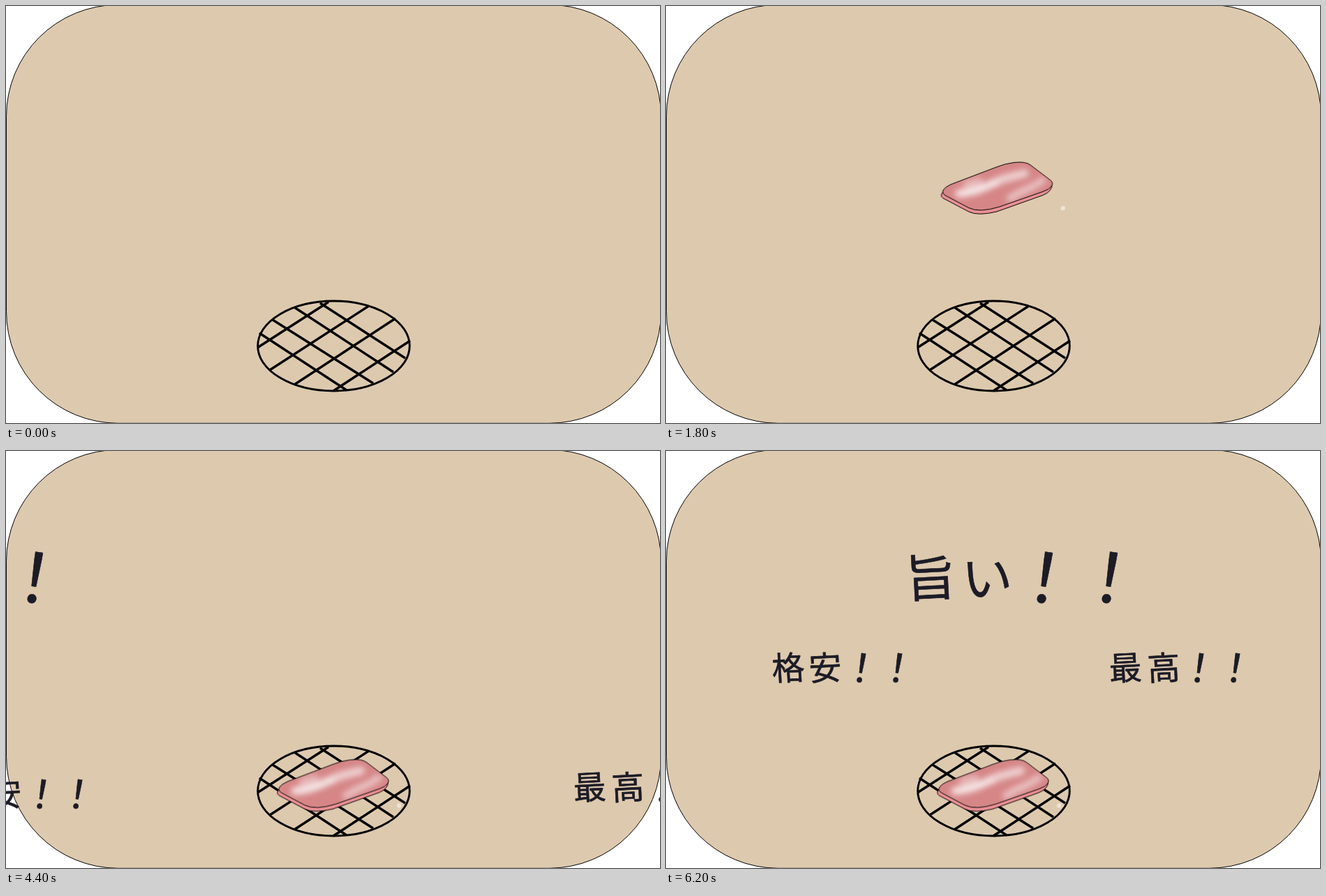
These frames come from a looping animation (937x598 px, 6500 ms). An HTML page:

```html
<!DOCTYPE html>
<html lang="ja">
<head>
<meta charset="utf-8">
<title>旨い！！</title>
<style>
  html, body { margin: 0; width: 100%; height: 100%; overflow: hidden; background: #fff; }
  svg { display: block; width: 937px; height: 598px; overflow: hidden; }
  text {
    font-family: "Noto Sans CJK JP", "Noto Sans CJK", sans-serif;
    font-weight: 500;
    fill: #1c1b26;
    stroke: #1c1b26;
    stroke-width: .6;
    stroke-linejoin: round;
  }
  .mark { font-weight: 400; }
</style>
</head>
<body>
<svg id="stage" viewBox="0 0 937 598">
  <defs>
    <filter id="soft" x="-30%" y="-60%" width="160%" height="220%">
      <feGaussianBlur stdDeviation="4.5"/>
    </filter>
    <path id="slice" d="M406 91.500 Q411 88 420 85 L478 63 Q490 58 503 56.500 Q520 54.500 527 60.500 L554 81 Q560 85 557 90 Q554 95 545 98 L482 120 Q453 129 438 121.500 L405 104 Q396 99 406 91.500 Z"/>
    <clipPath id="face"><use href="#slice"/></clipPath>
  </defs>

  <rect x=".5" y="-1.700" width="938" height="600" rx="160" fill="#ddc9ae" stroke="#000"/>

  <g fill="none" stroke="#000">
    <ellipse cx="469.500" cy="487.500" rx="108.800" ry="64.500" stroke-width="2.900"/>
    <path stroke-width="3.500" d="M450 426 L572 505 M413 432 L555 525 M382 450 L526 541 M363 469 L488 551
      M361 489.500 L462 424.500 M378 522 L520 430 M413 543 L558 448 M469 552 L579 480"/>
  </g>

  <g id="meat">
    <circle cx="573" cy="122" r="3.300" fill="#ede3d5"/>
    <path d="M402 97.500 Q396 104 401 107.500 L438 127 Q451 133.500 478 127 L544 103.500 Q558 98 557.500 87 Z" fill="#ea9094" stroke="#000"/>
    <use href="#slice" fill="#d68687"/>
    <g clip-path="url(#face)">
      <g filter="url(#soft)" fill="none" stroke="#fff" stroke-linecap="round" stroke-linejoin="round">
        <path d="M424 101 Q445 100 463 91 T491 79 L518 72" stroke-width="12" opacity=".62"/>
        <path d="M425 101 Q450 98 478 85" stroke-width="7" opacity=".55"/>
        <path d="M436 88 L452 84" stroke-width="13" opacity=".4"/>
        <path d="M497 108 Q511 99 521 95 T544 82" stroke-width="10" opacity=".5"/>
      </g>
    </g>
    <use href="#slice" fill="none" stroke="#000"/>
  </g>
</svg>
<script>
const stage = document.getElementById('stage');
const NS = 'http://www.w3.org/2000/svg';
const LOOP = 6500;

const add = (parent, tag, attrs) => {
  const el = parent.appendChild(document.createElementNS(NS, tag));
  for (const key in attrs) el.setAttribute(key, attrs[key]);
  return el;
};

// One line of lettering; each glyph is tilted around its own centre.
function line(chars, centers, y, size, markSize) {
  const text = add(stage, 'text', {});
  [...chars].forEach((ch, i) => {
    const mark = ch === '！';
    const s = mark ? markSize : size;
    const tilt = mark ? 9 : -3;
    const a = tilt * Math.PI / 180;
    const dx = s * .5, dy = -s * .38;
    add(text, 'tspan', {
      x: centers[i] - dx * Math.cos(a) + dy * Math.sin(a),
      y: y - dx * Math.sin(a) - dy * Math.cos(a),
      rotate: tilt,
      'font-size': s,
      class: mark ? 'mark' : 'glyph'
    }).textContent = ch;
  });
  return text;
}

// Hold at `from`, move in 100 ms steps between start and end, hold at `to`.
function move(el, start, end, from, to) {
  const at = ([x, y]) => `translate(${x}px, ${y}px)`;
  const frames = [
    { offset: start / LOOP, transform: at(from), easing: `steps(${(end - start) / 100})` },
    { offset: end / LOOP, transform: at(to) },
    { offset: 1, transform: at(to) }
  ];
  if (start) frames.unshift({ offset: 0, transform: at(from) });
  el.animate(frames, { duration: LOOP, iterations: Infinity });
}

const tasty = line('旨い！！', [379, 460, 543, 636], 181, 72, 98);
const cheap = line('格安！！', [175, 228, 280, 332], 310.5, 47, 56);
const best = line('最高！！', [658, 713, 764, 816], 310.5, 47, 56);

move(document.getElementById('meat'), 0, 3100, [3.4, -134.6], [-9.9, 386.4]);
move(tasty, 3100, 6200, [-1023, 0], [0, 0]);
move(cheap, 3100, 6200, [-394.6, 312], [0, 0]);
move(best, 3100, 6200, [306.6, 295], [0, 0]);
</script>
</body>
</html>
```
